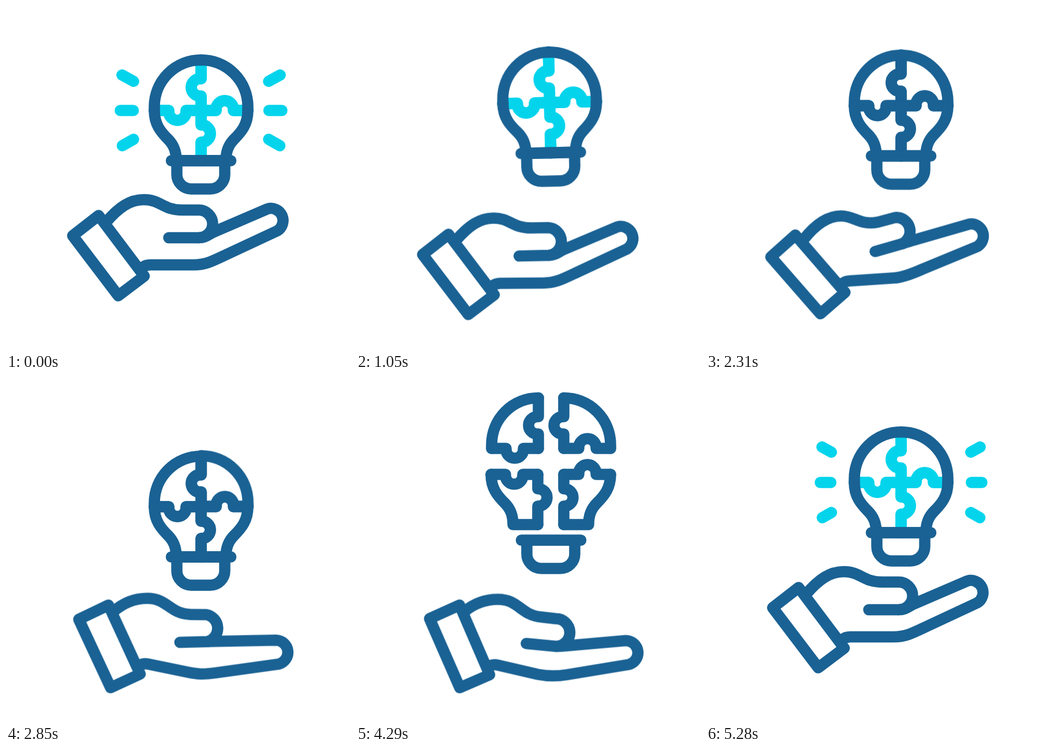
Animation of 596x596 px, one loop 5400 ms. Source, as an HTML page without scripts:

```html
<!DOCTYPE html>
<html lang="en">
<head>
<meta charset="utf-8">
<title>Idea in hand</title>
<style>
  html, body { margin: 0; width: 100%; height: 100%; overflow: hidden; background: #fff; }
  svg {
    display: block; width: 100%; height: 100%;
    --navy: #1a6294; --cyan: #03d4ec;
    fill: none; stroke: var(--navy); stroke-width: 19.5;
    stroke-linecap: round; stroke-linejoin: round;
  }
  .bulb, .hand, .cuff, .palm, .finger, .seams, .rays, .ray, .tl, .tr, .bl, .br {
    animation: 5.4s ease-in-out infinite;
  }

  /* Bulb: hop, tilt, hop, drop, rise */
  .bulb { transform-origin: 338px 290px; animation-name: bulb; }
  @keyframes bulb {
    0%, 6.11% { transform: translateY(0) rotate(0deg); animation-timing-function: cubic-bezier(.3, .3, .5, 1); }
    13.3%, 16.67% { transform: translateY(-16px) rotate(0deg); }
    27.2% { transform: translateY(0) rotate(-9deg); }
    39.4% { transform: translateY(-16px) rotate(0deg); }
    52.8%, 68.9% { transform: translateY(42px) rotate(0deg); }
    90% { transform: translateY(-16px) rotate(0deg); }
    97.2%, 100% { transform: translateY(0) rotate(0deg); }
  }

  /* Puzzle pieces leave one after another and return together */
  .tl { animation-name: tl; }
  .tr { animation-name: tr; }
  .bl { animation-name: bl; }
  .br { animation-name: br; }
  @keyframes tr {
    0%, 52.2% { transform: none; }
    60.6%, 82.2% { transform: translate(22px, -72px); }
    91.1%, 100% { transform: none; }
  }
  @keyframes tl {
    0%, 56.1% { transform: none; }
    64.6%, 82.2% { transform: translate(-22px, -72px); }
    91.1%, 100% { transform: none; }
  }
  @keyframes bl {
    0%, 58.7% { transform: none; }
    67%, 82.2% { transform: translate(-23px, -27px); }
    91.1%, 100% { transform: none; }
  }
  @keyframes br {
    0%, 61.3% { transform: none; }
    69.6%, 82.2% { transform: translate(22px, -27px); }
    91.1%, 100% { transform: none; }
  }

  .seams { stroke: var(--cyan); animation-name: seams; }
  @keyframes seams {
    0%, 29% { stroke: var(--cyan); }
    40%, 90.5% { stroke: var(--navy); }
    96.5%, 100% { stroke: var(--cyan); }
  }

  /* Rays shrink toward their outer ends */
  .rays { stroke: var(--cyan); animation-name: show; animation-timing-function: step-end; }
  .ray { stroke-dasharray: 1 2; animation-name: shrink; }
  @keyframes show {
    0% { opacity: 1; }
    16.6% { opacity: 0; }
    89.4% { opacity: 1; }
  }
  @keyframes shrink {
    0%, 6.11% { stroke-dasharray: 1 2; }
    16.6%, 89.4% { stroke-dasharray: 0 2; }
    96.7%, 100% { stroke-dasharray: 1 2; }
  }

  .hand { animation-name: hand; }
  @keyframes hand {
    0%, 6.11% { transform: translateY(0); animation-timing-function: cubic-bezier(.4, .1, .55, .95); }
    17.2%, 79.4% { transform: translateY(32.5px); }
    96.7%, 100% { transform: translateY(0); }
  }
  .cuff { transform-origin: 177.5px 433px; animation-name: cuff; }
  @keyframes cuff {
    0%, 16.67% { transform: translateX(0) rotate(0deg); }
    41.1% { transform: translateX(-1px) rotate(-4.4deg); }
    55.6%, 79.4% { transform: translateX(2px) rotate(13.6deg); }
    96.7%, 100% { transform: translateX(0) rotate(0deg); }
  }

  /* Hand poses: level, tilting, tilted, flat, lifting */
  .palm { animation-name: palm; }
  @keyframes palm {
    0%, 16.67%, 96.7%, 100% { d: path("M173 375C196 348 215 335.5 239 335.5C268 335.5 272 353.5 305 353.5L334 353.5A24 24 0 0 1 334 401.5L282 401.5"); }
    16.67% { animation-timing-function: ease-in; }
    27.2% { d: path("M171 369C193 345 212 331.5 235 331.5C262 331.5 268 347 300 344L327 340.5A24 24 0 0 1 335 387.5L286 395.5"); animation-timing-function: ease-out; }
    41.9% { d: path("M169 372C190 345 212 331 234 331C258 331 266 348 298 341.5L328 333.5A24 24 0 0 1 340 379L293 392.5"); }
    55.6%, 68.9% { d: path("M188 372C206 357 225 351 246 351C282 351 285 379 322 380.5L348 381.5A24 24 0 0 1 350 428.5L302 428.5"); }
    79.4% { d: path("M188 372C206 357 225 351 246 351C282 351 285 378 320 381.5L346 384.5A24 24 0 0 1 347 432.5L295 427.5"); }
  }
  .finger { animation-name: finger; }
  @keyframes finger {
    0%, 16.67%, 96.7%, 100% { d: path("M334 401.5C346 401.5 350 396 360 391.5L453 351.5A21 21 0 0 1 470 389.5L380 431.5C356 443 345 448.5 325 448.5L250 448.5Q242 448.5 236 453"); }
    16.67% { animation-timing-function: ease-in; }
    27.2% { d: path("M335 387.5C345 386 350 381.5 360 377.5L451 343A21 21 0 0 1 467.5 381.5L375 425C355 434 343 440 323 441L250 444.5Q240 445 236 450"); animation-timing-function: ease-out; }
    41.9% { d: path("M340 379C345 377 350 375.7 360 372.7L457 344.5A21 21 0 0 1 470 383.5L375 423C355 432 340 437.5 325 438.5L250 443.5Q240 444 236 449"); }
    55.6%, 68.9% { d: path("M350 428.5C355 428.5 358 428.5 364 428.5L469 429A21 21 0 0 1 473 470.5L362 483.5C340 486 330 484.5 315 481L246 465Q238 463 230 467"); }
    79.4% { d: path("M347 432.5C352 432.5 358 432 364 431.5L467 422.5A21 21 0 0 1 472 464L366 481.5C345 485 330 484 315 481L246 465Q238 463 230 467"); }
  }
</style>
</head>
<body>
<svg viewBox="0 0 596 596">
  <defs>
    <path id="north" d="M338 93.5V126H336A15 15 0 0 0 336 156H338V181"/>
    <path id="south" d="M338 181V206H339A15 15 0 0 1 339 236H338V268"/>
    <path id="west" d="M257 181H282V183A15 15 0 0 0 312 183V181H338"/>
    <path id="east" d="M338 181H364V179A15 15 0 0 1 394 179V181H419"/>
    <path id="dome" d="M338 93.5A81 81 0 0 0 257 174.5V181"/>
    <path id="neck" d="M257 181C257 205 268 218 281 231C291 241 295 252 295 268H338"/>
    <g id="side-rays">
      <path class="ray" pathLength="1" d="M201 119.5L221 130.5"/>
      <path class="ray" pathLength="1" d="M198 181H220.5"/>
      <path class="ray" pathLength="1" d="M201.5 242L221 231"/>
    </g>
  </defs>

  <g class="rays">
    <use href="#side-rays"/>
    <use href="#side-rays" transform="translate(676) scale(-1 1)"/>
  </g>

  <g class="hand">
    <path class="palm" d="M173 375C196 348 215 335.5 239 335.5C268 335.5 272 353.5 305 353.5L334 353.5A24 24 0 0 1 334 401.5L282 401.5"/>
    <path class="finger" d="M334 401.5C346 401.5 350 396 360 391.5L453 351.5A21 21 0 0 1 470 389.5L380 431.5C356 443 345 448.5 325 448.5L250 448.5Q242 448.5 236 453"/>
    <path class="cuff" d="M115.5 398L160.5 363L239.5 468L194.5 502Z"/>
  </g>

  <g class="bulb">
    <g class="seams">
      <g class="tl"><use href="#north"/><use href="#west"/></g>
      <g class="tr"><use href="#north"/><use href="#east"/></g>
      <g class="bl"><use href="#south"/><use href="#west"/></g>
      <g class="br"><use href="#south"/><use href="#east"/></g>
    </g>
    <g class="tl"><use href="#dome"/></g>
    <g class="tr"><use href="#dome" transform="translate(676) scale(-1 1)"/></g>
    <g class="bl"><use href="#neck"/></g>
    <g class="br"><use href="#neck" transform="translate(676) scale(-1 1)"/></g>
    <path d="M286.5 268H389.5M296 268V292A25 25 0 0 0 321 317H354A25 25 0 0 0 379 292V268"/>
  </g>
</svg>
</body>
</html>
```
